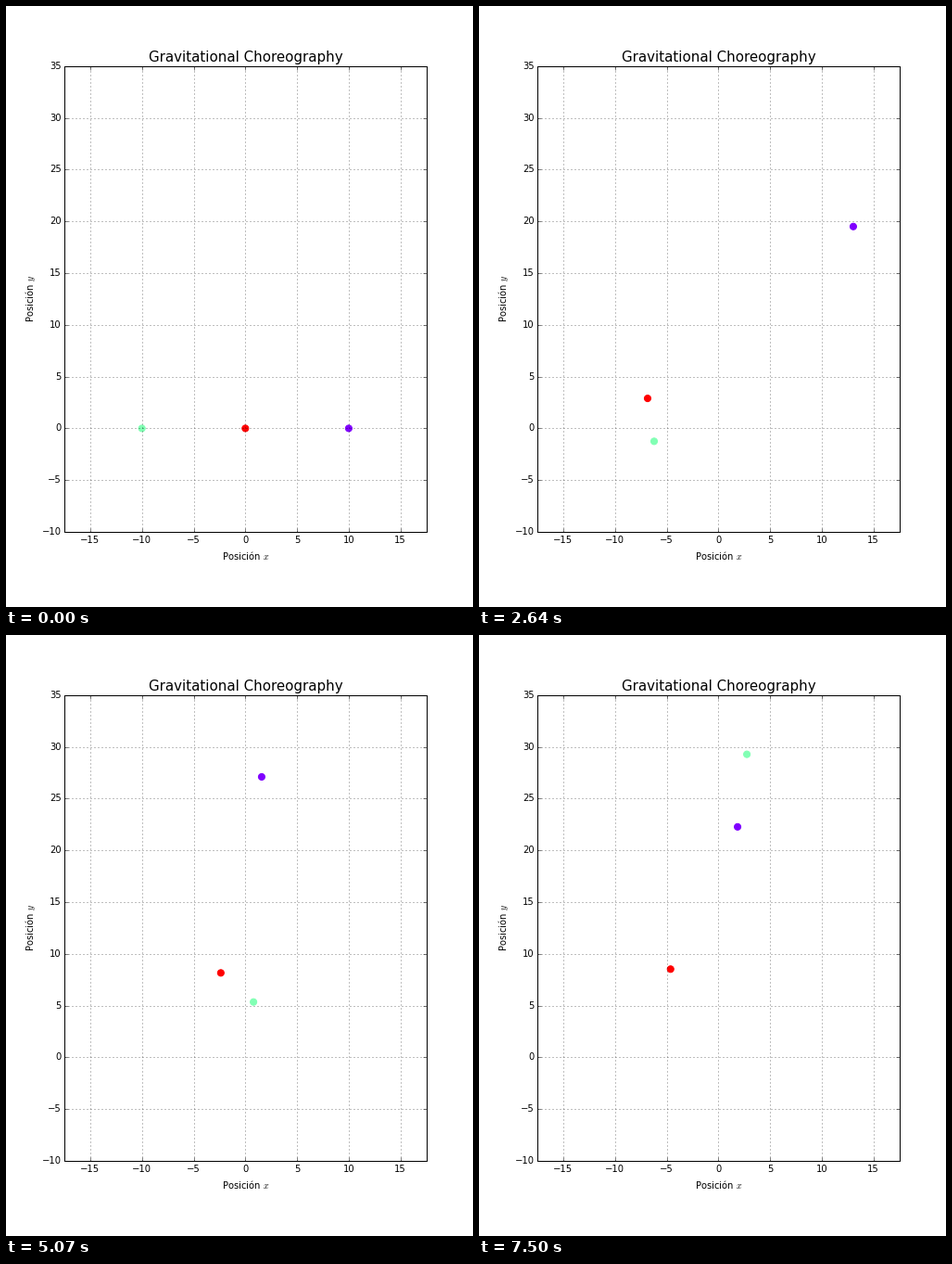
A matplotlib script that plays this animation: 504 by 648 pixels, repeating every 7.53 s.

```python
import matplotlib.pyplot as plt
import numpy as np
from matplotlib.animation import FuncAnimation

FRAMES = 251
PERIOD = 63        # frames per turn of the figure eight
DRIFT = 0.0801j    # upward motion of the centre of mass per frame

plt.rcParams.update({
    "font.family": "DejaVu Sans", "font.size": 10, "mathtext.fontset": "cm",
    "axes.linewidth": 1, "axes.axisbelow": False, "axes.labelpad": 5,
    "axes.titlepad": 5, "axes.titlesize": 15, "lines.scale_dashes": False,
    "lines.dotted_pattern": [1, 3], "grid.linestyle": ":",
    "grid.linewidth": 0.5, "grid.color": "black", "ytick.alignment": "center",
})
for side, pad in (("xtick", 4), ("ytick", 3)):
    plt.rcParams.update({
        f"{side}.direction": "in", f"{side}.major.size": 4,
        f"{side}.major.width": 0.5, f"{side}.major.pad": pad,
        f"{side}.labelsize": 10,
    })


def eight(t, share):
    """Place on the tilted figure eight, a given share of a turn ahead."""
    a = 2 * np.pi * (t / PERIOD + share)
    x = 10.96 * np.sin(a) - 0.24 * np.sin(5 * a)
    y = -3.37 * np.sin(2 * a) - 0.558 * np.sin(4 * a)
    return (x + 1j * y) * np.exp(-0.246j) + DRIFT * t


# The dance starts as a figure eight, then breaks up into these poses:
# frame: (violet, green), as x + yj
POSES = {
    26: (4 - 2.5j, -11.6 + 2.8j),
    42: (5.53 + 9.1j, -12.12 - 0.85j),
    66: (1.5 + 2.5j, 1.8 + 0.4j),
    88: (13.05 + 19.5j, -6.21 - 1.25j),
    104: (8.8 + 25j, -4.4 + 4j),
    124: (-1.83 + 19.75j, 1.68 + 2.74j),
    145: (-5 + 14j, -4.5 + 9j),
    169: (1.58 + 27.1j, 0.79 + 5.35j),
    182: (1 + 19.8j, 4 + 12j),
    207: (-4.88 + 14.93j, -1.38 + 16.45j),
    250: (1.86 + 22.27j, 2.76 + 29.28j),
}
START = np.arange(0, 16, 3)
TIMES = np.append(START, list(POSES)).astype(float)
POINTS = np.vstack([
    np.column_stack([eight(START, 1 / 3), eight(START, 2 / 3)]),
    list(POSES.values()),
])
SLOPES = np.gradient(POINTS, TIMES, axis=0)


def glide(t):
    """Cubic Hermite curve through the poses."""
    k = min(np.searchsorted(TIMES, t, side="right") - 1, len(TIMES) - 2)
    h = TIMES[k + 1] - TIMES[k]
    u = (t - TIMES[k]) / h
    ease = u * u * (3 - 2 * u)
    return (POINTS[k] * (1 - ease) + POINTS[k + 1] * ease
            + h * u * (1 - u) * ((1 - u) * SLOPES[k] - u * SLOPES[k + 1]))


def bodies(t):
    violet, green = glide(t)
    red = 3 * DRIFT * t - violet - green  # equal masses balance
    z = np.array([violet, green, red])
    return np.column_stack([z.real, z.imag])


fig = plt.figure(figsize=(7, 9), dpi=72, facecolor="white")
ax = fig.add_axes([0.125, 0.125, 0.775, 0.775])
ax.set(xlim=(-17.5, 17.5), ylim=(-10, 35),
       xlabel="Posición $x$", ylabel="Posición $y$")
ax.set_title("Gravitational Choreography", x=0.5025)
ax.set_xticks(range(-15, 16, 5))
ax.set_yticks(range(-10, 36, 5))
ax.tick_params(top=True, right=True)
ax.grid(True)

colors = plt.cm.rainbow([0.0, 0.5, 1.0])
dots = ax.scatter(*bodies(0).T, s=50, c=colors, edgecolors=colors, linewidths=1)


def update(frame):
    dots.set_offsets(bodies(frame))
    return (dots,)


anim = FuncAnimation(fig, update, frames=FRAMES, interval=30,
                     repeat=True, repeat_delay=0, blit=False)
plt.show()
```
